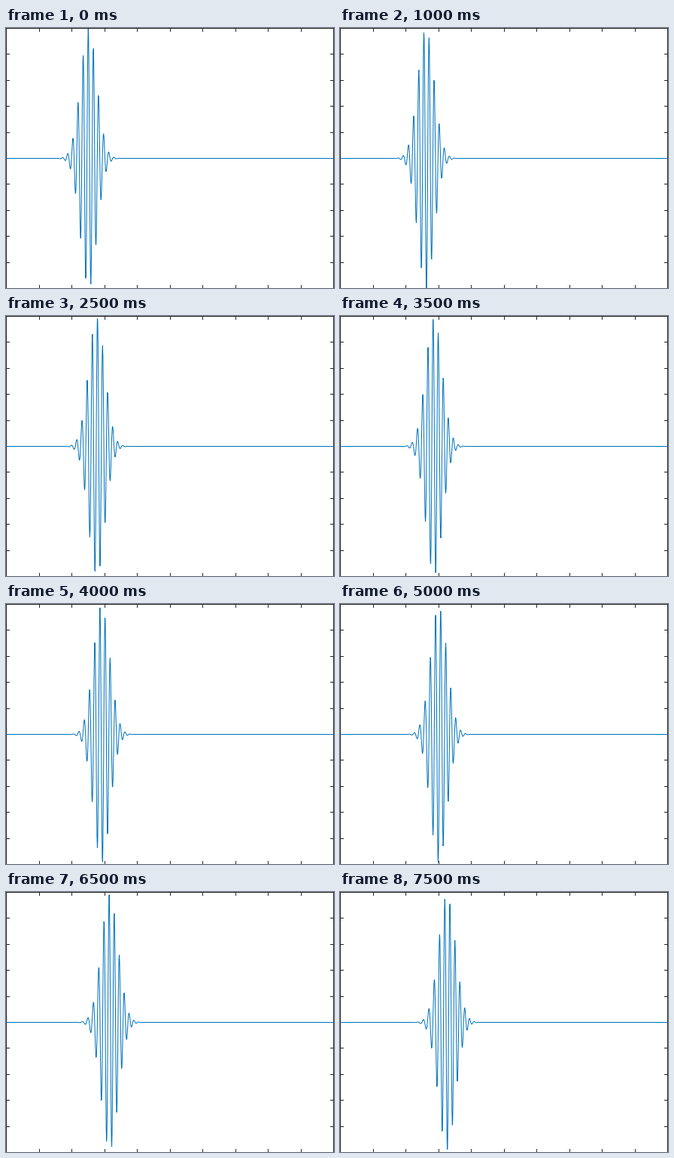
Recreate the animation shown at these times as a matplotlib script. Size 436 by 344 pixels, loop 8000 ms.

```python
import numpy as np
import matplotlib
import matplotlib.pyplot as plt
from matplotlib.animation import FuncAnimation
from matplotlib.collections import LineCollection

matplotlib.rcParams["path.simplify"] = False

W, H, DPI = 436, 344, 64
FRAMES, INTERVAL = 16, 500
PX = 72 / DPI  # one pixel in points

# Plot box in pixels; its bottom edge lies just off the stage.
LEFT, TOP, BOX_W, BOX_H = 0.5, 0.5, 435, 344
TICK = 4.5

# Free quantum wave packet, lengths in pixels and time in frames.
START = 108.8
SIGMA = BOX_W / 40
K = 400 / BOX_W
SPEED = 2.15
T0 = 0.5

x = LEFT + np.linspace(0, BOX_W, 1001)


def packet(t):
    """Real part of a Gaussian packet that drifts and spreads."""
    d = x - START - SPEED * t
    spread = 1 + 1j * SPEED * t / (K * SIGMA**2)
    phase = K * (d + SPEED * t / 2)
    psi = np.exp(-d**2 / (2 * SIGMA**2 * spread) + 1j * phase)
    return (psi / np.sqrt(spread)).real


def box_lines():
    right, bottom = LEFT + BOX_W, TOP + BOX_H
    lines = [
        [(0, TOP), (W, TOP)],
        [(LEFT, 0), (LEFT, H)],
        [(right, 0), (right, H)],
    ]
    for i in range(1, 10):
        tx = np.floor(LEFT + BOX_W * i / 10) + 0.5
        ty = np.floor(TOP + BOX_H * i / 10) + 0.5
        lines += [
            [(tx, TOP), (tx, TOP + TICK)],
            [(tx, bottom), (tx, bottom - TICK)],
            [(LEFT, ty), (LEFT + TICK, ty)],
            [(right, ty), (right - TICK, ty)],
        ]
    return lines


fig = plt.figure(figsize=(W / DPI, H / DPI), dpi=DPI, facecolor="white")
ax = fig.add_axes([0, 0, 1, 1])
ax.set_xlim(0, W)
ax.set_ylim(H, 0)
ax.axis("off")

box = LineCollection(box_lines(), colors="#262626", linewidths=PX, zorder=1)
box.set_snap(False)
ax.add_collection(box)

wave, = ax.plot([], [], color="#0072BD", lw=PX, zorder=2,
                solid_joinstyle="round", snap=False)


def draw(i):
    wave.set_data(x, TOP + BOX_H / 2 * (1 - packet(i + T0)))
    return wave,


anim = FuncAnimation(fig, draw, frames=FRAMES, interval=INTERVAL,
                     repeat=True, repeat_delay=0, blit=False)
plt.show()
```
